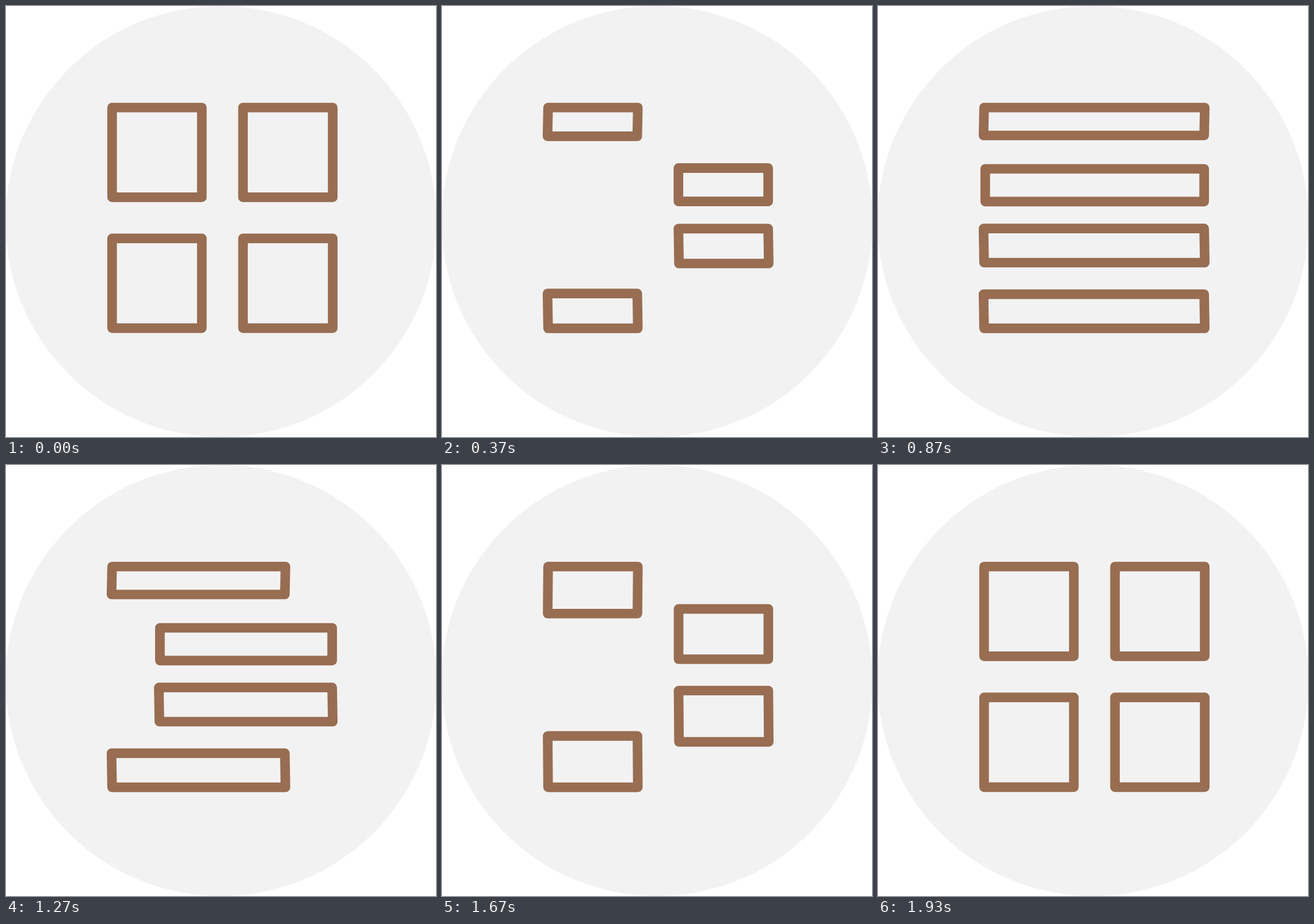
An HTML page for the animation above (2000 ms loop, 747 by 749 pixels).

```html
<!DOCTYPE html>
<html>
<head>
<meta charset="utf-8">
<title>Grid to list</title>
<style>
html, body { margin: 0; width: 100%; height: 100%; overflow: hidden; background: #fff; }
svg { display: block; width: 100%; height: 100%; }
path { fill: none; stroke: #986d52; stroke-width: 16.7; stroke-linejoin: round; }
</style>
</head>
<body>
<svg viewBox="0 0 747 749">
  <circle cx="373.5" cy="374.5" r="374.5" fill="#f2f2f2"/>
  <path/><path/><path/><path/>
</svg>
<script>
const FPS = 30, LOOP = 2000;
const X = 184.3, Y = 176.5, SIZE = 155.9, STEP = 227.4;

// The bars of the list, from top to bottom.
const bars = [
  { top: Y, bottom: 225, left: X },
  { top: 283, bottom: 339.8, left: X + 3 },
  { top: 386.7, bottom: 446, left: X },
  { top: 500.9, bottom: 560.2, left: X }
];
const paths = document.querySelectorAll('path');

const mix = (a, b, k) => a + (b - a) * k;

function ease(f, from, to) {
  const u = Math.min(1, Math.max(0, (f - from) / (to - from)));
  return u * u * (3 - 2 * u);
}

// Squares run clockwise from the top left; each one flattens, then widens.
function outline(bar, i, squash, widen) {
  const x = i === 1 || i === 2 ? X + STEP : X;
  const y = i > 1 ? Y + STEP : Y;
  const left = mix(x, bar.left, widen);
  const right = mix(x, X + STEP, widen) + SIZE;
  const top = mix(y, bar.top, squash);
  const bottom = mix(y + SIZE, bar.bottom, squash);
  // Edges lean a little to the left while flat.
  const upper = i > 0 ? squash : 0;
  const lower = i < 2 ? squash : 0;
  return `M${left - upper} ${top}H${right - upper}L${right - lower} ${bottom}H${left - lower}Z`;
}

function draw(now) {
  // Steps begin on times rounded to 10 ms, hence the small offset.
  const f = Math.floor((now % LOOP + 3.4) * FPS / 1000) % 60;
  const squash = ease(f, 0, 11.8) - ease(f, 45.3, 58);
  const widen = ease(f, 12, 26) - ease(f, 33, 45.3);
  bars.forEach((bar, i) => paths[i].setAttribute('d', outline(bar, i, squash, widen)));
}

const start = performance.now();
function tick() {
  draw(performance.now() - start);
  requestAnimationFrame(tick);
}
tick();
</script>
</body>
</html>
```
